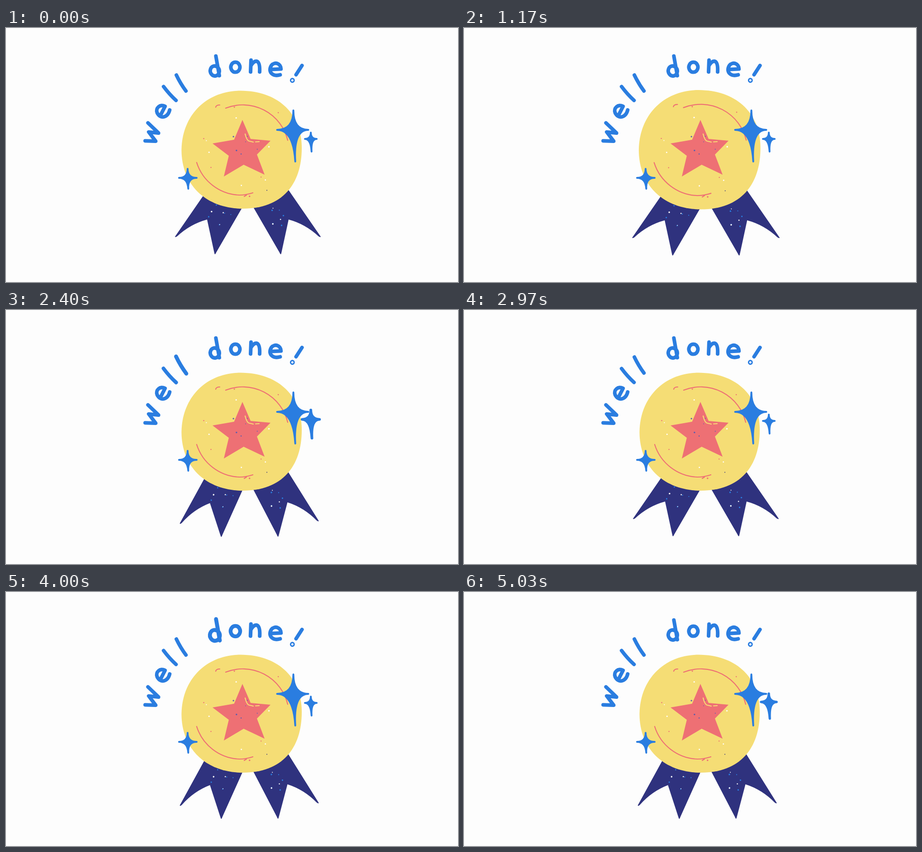
Recreate the animation shown at these times as an HTML page. Size 998 by 561 pixels, loop 5060 ms.

```html
<!DOCTYPE html>
<html lang="en">
<head>
<meta charset="utf-8">
<title>well done!</title>
<style>
  html, body { margin: 0; height: 100%; overflow: hidden; background: #fdfdfd; }
  svg { display: block; width: 100%; height: 100%; }
  .pulse { transform-box: fill-box; transform-origin: center; }
  .ink { fill: none; stroke: #2a7de0; stroke-width: 8; stroke-linecap: round; stroke-linejoin: round; }
  .spark { fill: #2a7de0; stroke: #2a7de0; stroke-width: 4; stroke-linejoin: round; }
  .navy { fill: #2f327e; }
  .line { fill: none; stroke: #ee7074; stroke-width: 2.2; stroke-linecap: round; }
</style>
</head>
<body>
<svg viewBox="0 0 998 561" role="img" aria-label="well done!">
  <g id="award">
    <g id="ribbons"></g>
    <path fill="#f5dd75" d="M518 138.5C602 139 653 190 653 265C653 345 610 399 523 399C445 399 388 350 387.5 270C388 195 440 139 518 138.5Z"/>
    <g id="marks">
      <path class="line" d="M485 177A102 102 0 0 1 622 248M421 297A103 103 0 0 0 515 369Q530 369 545 364M526 372L531 369M463 175Q464 170 472 170"/>
    </g>
  </g>
  <g id="star"></g>
  <g id="sparks"></g>
  <g id="words"></g>
</svg>
<script>
const LOOP = 5060, STEP = 100 / 3, BEATS = 13;
const BLUE = '#2a7de0', PINK = '#ee7074', WHITE = '#fff';
const $ = id => document.getElementById(id);

function add(parent, tag, attrs) {
  const el = document.createElementNS('http://www.w3.org/2000/svg', tag);
  for (const k in attrs) el.setAttribute(k, attrs[k]);
  return parent.appendChild(el);
}

let seed = 7;
const random = () => (seed = seed * 16807 % 2147483647) / 2147483647;

// Print specks spread over a ring-shaped area.
function scatter(parent, fill, count, x, y, inner, outer) {
  for (let i = 0; i < count; i++) {
    const angle = (i + random()) / count * 2 * Math.PI;
    const r = inner + (outer - inner) * random();
    add(parent, 'circle', { cx: x + r * Math.cos(angle), cy: y + r * Math.sin(angle), r: 0.8 + random(), fill });
  }
}

// Smooth bump: 1 at the centre, 0 from `half` beats away.
function bump(beat, centre, half) {
  const d = Math.abs(beat - centre) / half;
  return d < 1 ? Math.cos(d * Math.PI / 2) ** 2 : 0;
}

function ease(beat, from, to) {
  const x = Math.min(1, Math.max(0, (beat - from) / (to - from)));
  return x * x * (3 - 2 * x);
}

// Both ribbons share one shape, mirrored about x = 534.
function ribbon(transform) {
  const el = add(add($('ribbons'), 'g', { transform }), 'g', {});
  add(el, 'path', {
    class: 'navy',
    d: 'M373 461L462 332L545 356L464 496Q461 503 460 497L444 423Q407 433 378 460Q374 463 373 461Z'
  });
  scatter(el, BLUE, 5, 470, 412, 8, 28);
  scatter(el, WHITE, 3, 470, 412, 8, 28);
  return el;
}
const left = ribbon(''), right = ribbon('translate(1068) scale(-1 1)');

scatter($('marks'), PINK, 6, 521, 270, 70, 120);
scatter($('marks'), WHITE, 6, 521, 270, 55, 100);
scatter($('marks'), '#2f327e', 1, 560, 350, 10, 30);

// Inner corners lie between neighbouring tips, pulled towards the centre.
const tips = [[522, 203], [584, 249], [571, 324], [481, 328], [456, 255]], hub = [523, 270];
const corners = tips.flatMap((tip, i) => {
  const next = tips[(i + 1) % 5];
  return [tip, hub.map((h, k) => h + 0.57 * ((tip[k] + next[k]) / 2 - h))];
});
add($('star'), 'polygon', { points: corners.join(' '), fill: PINK });
add($('star'), 'path', {
  class: 'line', style: 'stroke:#f8dc74', d: 'M528 234Q532 250 538 250L546 252M551 251.5L559 251'
});
scatter($('star'), '#5f5fae', 6, 521, 265, 10, 34);

// Parts that swell: each bump is [centre, half width, extra size].
const parts = [];

function spark(x, y, [up, right, down, left], ...bumps) {
  const d = `M${x} ${y - up}Q${x} ${y} ${x + right} ${y}Q${x} ${y} ${x + down * 0.06} ${y + down}` +
    `Q${x} ${y} ${x - left} ${y}Q${x} ${y} ${x} ${y - up}Z`;
  parts.push({ el: add($('sparks'), 'path', { class: 'spark pulse', d }), bumps });
}
spark(634.5, 225, [43, 33, 70, 36], [1.5, 1.4, 0.15]);
spark(673, 245, [14, 13, 28, 13], [1.5, 1.4, 0.2], [7.2, 1.7, 0.5]);
spark(401, 331, [20, 20, 24, 19], [1.8, 1.2, 0.1]);

const ring = (x, y, rx, ry) => `M${x} ${y - ry}a${rx} ${ry} 0 1 1 -.1 0Z`;
const glyphs = {
  w: 'M-22 -6L-14 16L-1 -6L5 15L17 -15',
  e: 'M-10 2L11 -2C9 -14 -5 -17 -11 -7C-18 8 -5 18 11 11',
  l: 'M0 -21Q-2 0 0 20',
  d: 'M8 -23V21' + ring(0, 9, 10, 11),
  o: ring(0, 0, 10, 11),
  n: 'M-9 -13L-10 13M-9 -1Q-2 -13 5 -10Q11 -6 10 13',
  '!': 'M0 -12V12' + ring(0, 27, 1.5, 1.5)
};

// Each place is [x, y, tilt]; the swell passes from letter to letter.
function word(text, places, first, lag) {
  places.forEach(([x, y, tilt], i) => {
    const spot = add($('words'), 'g', { transform: `translate(${x} ${y}) rotate(${tilt})` });
    const el = add(spot, 'path', { class: 'ink pulse', d: glyphs[text[i]] });
    parts.push({ el, bumps: [[first + lag * i, 1, 0.18]] });
  });
}
word('well', [[321, 231, -68], [346, 183, -52], [362, 145, -42], [387, 122, -31]], 5.7, 0.25);
word('done!', [[459.5, 86, -10], [506.5, 86.5, 0], [550, 84, 0], [596, 91, 8], [647, 93, 33]], 2.5, -0.15);

function draw(now) {
  const beat = (now % LOOP) / STEP % BEATS;
  for (const { el, bumps } of parts) {
    const size = bumps.reduce((s, [centre, half, extra]) => s + extra * bump(beat, centre, half), 1);
    el.style.transform = `scale(${size})`;
  }
  const swing = ease(beat, 1.3, 2.8) - ease(beat, 8.1, 8.9);
  left.setAttribute('transform', `rotate(${-5.85 * swing} 481 363)`);
  right.setAttribute('transform', `rotate(${-2.6 * swing} 485 368)`);
  const grow = 1 + 0.015 * bump(beat, 9.5, 1.3);
  $('award').setAttribute('transform', `translate(521 270) scale(${grow}) translate(-521 -270)`);
  $('marks').setAttribute('transform', `rotate(${1.2 * bump(beat, 1.5, 1.4)} 521 270)`);
}

let start;
function tick(now) {
  start ??= now;
  draw(now - start);
  requestAnimationFrame(tick);
}
requestAnimationFrame(tick);
</script>
</body>
</html>
```
